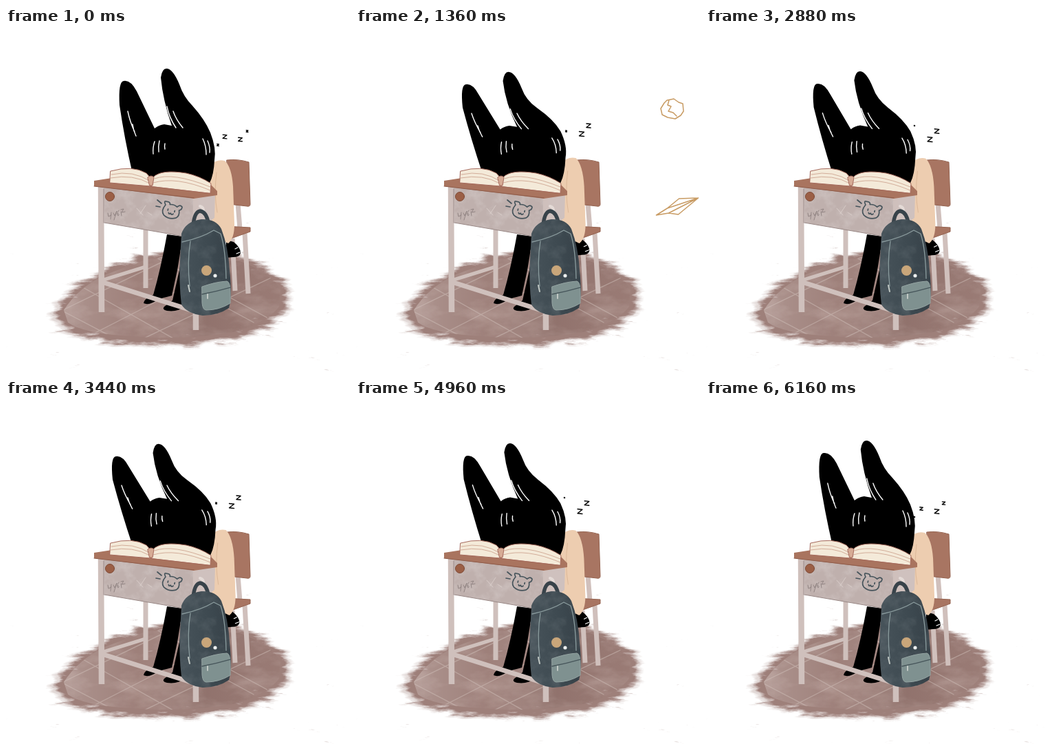
Write an HTML page that moves like this. It is 500 px wide and 500 px high and loops after 6.24 s.

```html
<!DOCTYPE html>
<html lang="en">
<head>
<meta charset="utf-8">
<title>Asleep at the desk</title>
<style>
html, body { margin: 0; width: 100%; height: 100%; overflow: hidden; background: #fff; }
svg { position: absolute; left: 0; top: 0; width: 500px; height: 500px; will-change: transform;
  fill: none; stroke-linecap: round; stroke-linejoin: round; }
</style>
</head>
<body>
<!-- floor -->
<svg viewBox="0 0 500 500">
  <defs>
    <filter id="dust" filterUnits="userSpaceOnUse" x="0" y="280" width="500" height="220" color-interpolation-filters="sRGB">
      <feTurbulence type="fractalNoise" baseFrequency=".035 .16" numOctaves="5" seed="4"/>
      <feColorMatrix values="0 0 0 0 0  0 0 0 0 0  0 0 0 0 0  1 0 0 0 0" result="noise"/>
      <feGaussianBlur in="SourceGraphic" stdDeviation="8" result="soft"/>
      <feComposite in="soft" in2="noise" operator="arithmetic" k2=".5" k3=".5"/>
      <feComponentTransfer result="edge"><feFuncA type="linear" slope="6" intercept="-2.5"/></feComponentTransfer>
      <feFlood flood-color="#9e807a"/>
      <feComposite in2="edge" operator="in"/>
    </filter>
    <filter id="blotch" filterUnits="userSpaceOnUse" x="50" y="310" width="380" height="165" color-interpolation-filters="sRGB">
      <feTurbulence type="fractalNoise" baseFrequency=".018 .04" numOctaves="5" seed="9"/>
      <feColorMatrix values="0 0 0 0 .95  0 0 0 0 .9  0 0 0 0 .88  2 0 0 0 -.85"/>
      <feComposite in2="SourceGraphic" operator="in"/>
    </filter>
    <linearGradient id="shade" x1="0" x2="1">
      <stop offset="0" stop-color="#fff" stop-opacity=".18"/>
      <stop offset=".35" stop-color="#fff" stop-opacity="0"/>
      <stop offset=".65" stop-color="#5c3d38" stop-opacity=".2"/>
      <stop offset="1" stop-color="#7a5650" stop-opacity=".1"/>
    </linearGradient>
    <path id="ground" d="M74 410Q96 374 142 353L205 329L255 326L345 333Q393 352 409 379L407 407Q387 434 340 449Q260 465 180 457Q110 453 80 432Z"/>
    <clipPath id="inside"><path d="M84 410Q106 376 146 358L205 336L255 333L340 339Q386 356 399 381L397 405Q380 427 336 441Q260 455 182 448Q112 444 90 428Z"/></clipPath>
  </defs>
  <use href="#ground" filter="url(#dust)" fill="#000" opacity=".3" transform="translate(-12 -9) scale(1.045 1.025)"/>
  <use href="#ground" filter="url(#dust)" fill="#000"/>
  <use href="#ground" fill="url(#shade)" clip-path="url(#inside)"/>
  <g clip-path="url(#inside)">
    <use href="#ground" fill="#000" filter="url(#blotch)" opacity=".25"/>
    <path d="M70 416L225 341M118 449L300 356M190 456L400 356M110 376L250 455M70 405L160 452M215 332L400 432M290 390L360 428" stroke="#cfbfb9" stroke-width="1.4" opacity=".5"/>
  </g>
</svg>

<!-- chair, pupil, thrown paper -->
<svg viewBox="0 0 500 500">
  <g stroke="#c89b63" stroke-width="1.5">
    <path id="planeA" d="M30-14L2-13L-15 1L-31 11L-13 8L30-14M-15 1L30-14M-13 8L1 10L30-14"/>
    <path id="planeB" d="M-32 18L21-18L27-3L-32 18L25-11M27-3L28 5L32 4L30-9L34-8"/>
    <path id="ballA" d="M-8-13L2-15L9-10L15-8L16 3L12 9L4 14L-7 12L-15 8L-17-1L-12-9ZM-5-13L-7-6L-2-4L-6 3L1 5L6 10"/>
    <path id="ballB" stroke="#b5854f" d="M-7-15Q3-19 11-12Q18-4 16 5Q12 16 1 17Q-10 17-15 8Q-19-2-13-10ZM1-15L-4-10L0-5L-5 0L-1 5L-5 10L1 15M1-15Q11-13 10-3Q13 8 1 15"/>
  </g>
  <path d="M234 300L257 303L249 352L241 389L222 394Q208 404 200 400Q201 393 214 388Q225 350 234 300Z" fill="#000"/>
  <path d="M260 303L272 305L256 385Q261 396 259 405Q250 413 234 411Q226 409 230 405L242 396L252 352Z" fill="#000"/>
  <path d="M337 255L340 292M347 298L352 386M329 306L333 382" stroke="#d0c0bc" stroke-width="7" stroke-linecap="butt"/>
  <g fill="#a87562" stroke="#94624f">
    <path d="M321 192Q337 190 353 195L355 256Q355 260 350 259L324 256Z"/>
    <path d="M318 288L355 290L355 296L327 306L318 304Z"/>
  </g>
  <g id="hand">
    <path d="M320 308L331 311Q341 319 341 327Q340 333 330 333L320 334Z" fill="#000"/>
    <path d="M333 321L337 319M335 328L340 326" stroke="#fff" stroke-width="1.2"/>
  </g>
  <path class="lean" fill="#edcdb0" d="M296 200Q306 190 318 193Q328 202 330 230L332 285Q332 306 323 313L296 300Z"/>
  <path class="lean" stroke="#dcb899" d="M306 210Q302 240 307 268"/>
  <path class="lean" fill="#000" d="M184 212Q172 160 165 112Q163 78 171 77Q181 75 190 92L216 146Q222 141 230 140L241 142Q228 105 225 72Q227 58 234 59Q243 60 252 82Q258 100 271 113Q289 133 297 152Q306 175 303 192Q302 214 296 225L200 225Z"/>
  <path class="lean" stroke="#fff" stroke-width="1.4" d="M177 121Q180 136 187 151M184 140Q185 149 189 157M234 114Q237 130 247 145M243 121Q247 133 257 145M216 165Q213 174 214 183M223 164Q221 172 222 180M231 168Q230 172 231 176M286 161Q291 171 291 184M293 164Q297 173 296 181"/>
  <path id="zees" stroke="#000" stroke-width="1.4"/>
</svg>

<!-- desk, book, bag -->
<svg viewBox="0 0 500 500">
  <defs>
    <filter id="grain" x="0" y="0" width="1" height="1" color-interpolation-filters="sRGB">
      <feTurbulence type="fractalNoise" baseFrequency=".06" numOctaves="5" seed="7"/>
      <feColorMatrix values="0 0 0 0 1  0 0 0 0 1  0 0 0 0 1  1.6 0 0 0 -.68"/>
      <feComposite in2="SourceGraphic" operator="in"/>
    </filter>
    <linearGradient id="bagFill" x1="0" x2="1">
      <stop offset="0" stop-color="#47535a"/><stop offset=".5" stop-color="#3f4b52"/><stop offset="1" stop-color="#364148"/>
    </linearGradient>
    <path id="panel" d="M142 231L272 246L271 305L143 283Z"/>
    <path id="bag" d="M255 299Q261 281 284 278Q305 277 313 292Q323 318 325 352Q329 390 324 407Q308 418 286 418Q263 415 255 402Q251 370 253 335Z"/>
  </defs>
  <path d="M272 246L304 242L303 276L272 300Z" fill="#cfc1be"/>
  <g stroke="#cfc0bc" stroke-linecap="butt">
    <path d="M203 292V378" stroke-width="7"/>
    <path d="M142 366L203 347" stroke-width="5"/>
    <path d="M142 370L272 411" stroke-width="7"/>
    <path d="M138 230L139 413M275 245L276 439" stroke-width="8.500"/>
  </g>
  <use href="#panel" fill="#bfb0ad"/>
  <use href="#panel" fill="#000" filter="url(#grain)" opacity=".3"/>
  <path d="M143 283L271 305M142 234V283" stroke="#998886"/>
  <path d="M128 222L154 218L298 228L307 237L307 243L273 248L128 230Z" fill="#a9745f"/>
  <path d="M128 230L273 247" stroke="#8f5c4a"/>
  <circle cx="151" cy="245" r="6.500" fill="#9b5f46" stroke="#7f4a35"/>
  <path d="M148 269L149 274L153 272M153 268L152 278M156 269L158 273L161 266L157 279M164 265Q160 270 163 273Q166 270 162 270M167 267L168 273M167 264L171 263L168 268L173 267" stroke="#8d807f" stroke-width=".9"/>
  <path d="M190 262L199 272M195 270L203 258M206 268L212 272" stroke="#ddd2cf" stroke-width=".8"/>
  <g stroke="#46545b" stroke-width="1.700">
    <g transform="rotate(14 239 266)">
      <path d="M230 259Q225 253 231 254Q236 253 236 257Q242 255 247 258Q250 253 254 256Q255 260 251 262Q254 270 249 274Q240 279 231 274Q225 269 230 259Z"/>
      <path d="M235 264V266M245 264V266M237 269Q238 272 240 269Q242 272 244 269"/>
    </g>
    <path d="M220 250L226 255M218 259L224 260"/>
  </g>
  <g stroke="#a4685b" fill="#f4ead9">
    <path d="M152 208Q184 199 204 211L211 219L210 230L151 225Z"/>
    <path d="M211 230L214 217Q225 205 262 211Q281 215 298 226L297 240Z"/>
    <path d="M153 213Q185 206 210 223M152 218Q185 212 209 226M216 219Q242 209 297 231M214 225Q247 215 297 236" fill="none" stroke="#c99e89" stroke-width=".8"/>
    <path d="M206 217Q211 213 215 217L213 229H209Z" fill="#d6ab95"/>
  </g>
  <path d="M282 259Q289 261 286 269" stroke="#e4dad6" stroke-width="4"/>
  <path d="M272 287Q274 267 282 266Q291 267 294 283" stroke="#38434a" stroke-width="5.500"/>
  <use href="#bag" fill="url(#bagFill)"/>
  <use href="#bag" fill="#000" filter="url(#grain)" opacity=".12"/>
  <path d="M256 311Q284 305 302 294L312 299Q319 320 320 364M267 375Q263 340 268 310" stroke="#8b9c9e" stroke-width="1.300"/>
  <path d="M285 376Q304 369 321 368Q326 369 326 384L326 400Q310 410 291 410Q286 410 285 400Z" fill="#7f9190" stroke="#96a5a3"/>
  <path d="M285 387Q305 383 326 377" stroke="#46555a" stroke-width="1.300"/>
  <path d="M265 374L267 383M293 387V393" stroke="#c1c8c4" stroke-width="2"/>
  <circle cx="291.500" cy="352.500" r="7.500" fill="#c9a67a"/>
  <circle cx="304" cy="360" r="2.600" fill="#edf0ef"/>
</svg>

<script>
const LOOP = 6240, STEP = 80, BREATH = 2080;
const Z_PAIRS = 12, Z_LIFE = 832, Z_TRAVEL = 52;
const $ = id => document.getElementById(id);
const clamp = v => Math.max(0, Math.min(1, v));
const ease = v => (1 - Math.cos(Math.PI * clamp(v))) / 2;

const leaners = [...document.querySelectorAll(".lean")].map(el => ({ el, d: el.getAttribute("d") }));

// a = 0 upright, 1 fully leaning: ears swing left and sink, the back rises
function lean(x, y, a) {
  const h = clamp((208 - y) / 110), back = clamp((x - 270) / 33);
  const dx = 2 * back - 14 * h * clamp((305 - x) / 45);
  const dy = 6 * h * h - 5 * back * clamp((225 - y) / 30);
  return `${(x + a * dx).toFixed(2)} ${(y + a * dy).toFixed(2)}`;
}

function drawPupil(t) {
  const p = t % BREATH;
  const a = p < 1080 ? ease((p - 340) / 740) : 1 - ease((p - 1080) / 1000);
  for (const { el, d } of leaners)
    el.setAttribute("d", d.replace(/([\d.]+) ([\d.]+)/g, (_, x, y) => lean(+x, +y, a)));
  $("hand").setAttribute("transform", `translate(${-2 * a} ${-4 * a})`);
}

// one z drifts right, growing and shrinking on the way
function zee(age, y) {
  const u = (age + LOOP) % LOOP / Z_LIFE;
  if (u > 1) return "";
  const s = 1 + 6 * Math.sin(Math.PI * u);
  return `M${303 + Z_TRAVEL * u - s / 2} ${y - s / 2}l${s} ${s * .1}l${-s} ${s * .8}l${s} ${s * .1}`;
}

function drawZees(t) {
  let d = "";
  for (let k = 0; k < Z_PAIRS; k++) {
    const age = t + 240 - k * LOOP / Z_PAIRS, y = 150 + 8 * Math.cos(k * Math.PI / 2);
    d += zee(age, y) + zee(age - 160, y + 12);
  }
  $("zees").setAttribute("d", d);
}

// a throw passes (x, y) at time `at`, with speed in px/ms, pull in px/ms² and spin in deg/ms
const throws = [
  { id: "planeA", at: 1360, x: 467.5, y: 261, vx: .8, vy: .08, pull: 0, spin: -.01 },
  { id: "ballA", at: 1360, x: 460, y: 118, vx: .75, vy: .1, pull: .0002, spin: .4 },
  { id: "ballB", at: 2160, x: 461, y: 389, vx: .33, vy: .16, pull: 0, spin: .3 },
  { id: "planeB", at: 4000, x: 136, y: 150, vx: -.875, vy: -.05, pull: 0, spin: .01 }
];

function drawThrow({ id, at, x, y, vx, vy, pull, spin }, t) {
  const dt = t - at;
  $(id).setAttribute("transform",
    `translate(${x + vx * dt} ${y + vy * dt + pull * dt * dt}) rotate(${spin * dt})`);
}

let shown = -1;
const start = performance.now();
function frame(now) {
  const t = Math.floor(Math.max(0, now - start) % LOOP / STEP) * STEP;
  if (t !== shown) {
    shown = t;
    drawPupil(t);
    drawZees(t);
    throws.forEach(o => drawThrow(o, t));
  }
  requestAnimationFrame(frame);
}
frame(start);
</script>
</body>
</html>
```
